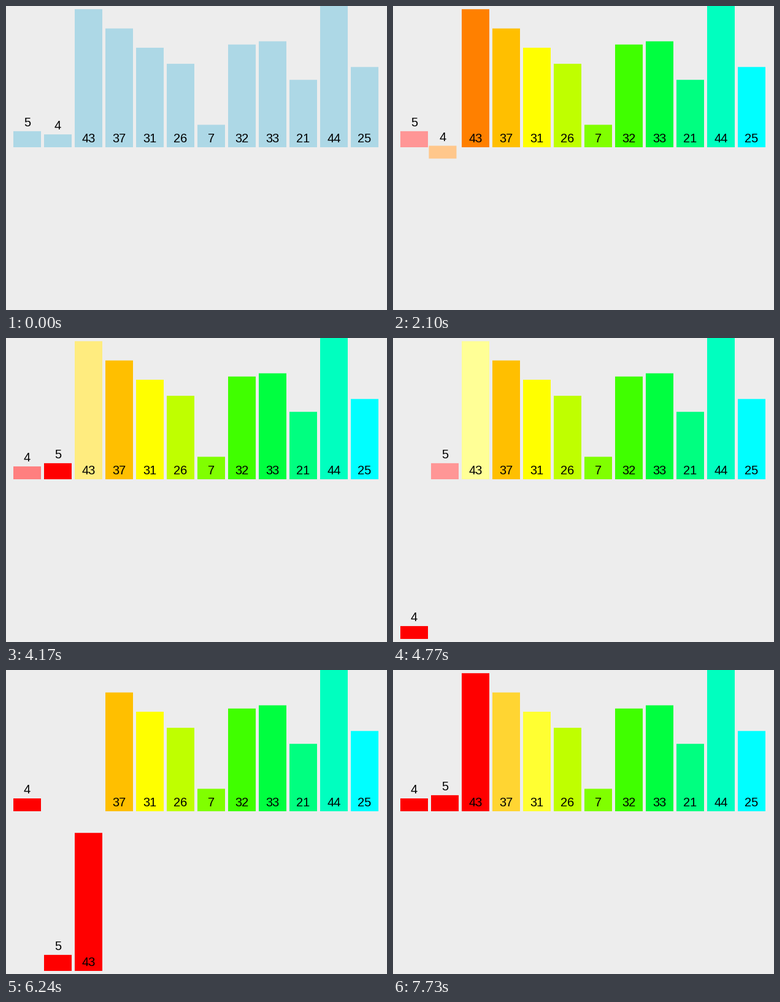
A matplotlib script that plays this animation: 621x495 px, repeating every 8000 ms.

```python
import colorsys

import matplotlib.pyplot as plt
import numpy as np
from matplotlib.animation import FuncAnimation
from matplotlib.patches import Rectangle

W, H, DPI = 621, 495, 100
LOOP, INTERVAL = 8000, 40
TICK = 148.9                               # the picture is refreshed in coarse ticks
START, BEAT, MOVE = 1028, 497, 240         # first action, spacing, tween length (ms)

VALUES = [5, 4, 43, 37, 31, 26, 7, 32, 33, 21, 44, 25]
UNIT = 230 / 44
BASE, DROP = 230, 260
LEFT, PITCH, BAR_W = 12, 50, 45

IDLE = np.array([173, 216, 230]) / 255
RED = np.array([1.0, 0, 0])


def hue_color(i):
    degrees = 15 * (i + (i > 7))
    return np.array(colorsys.hsv_to_rgb(degrees / 360, 1, 1))


def pale(color):
    return np.minimum(color + 150 / 255, 1)


def ease(u):
    u = min(max(u, 0), 1)
    return 4 * u**3 if u < 0.5 else 1 - (2 - 2 * u)**3 / 2


HUES = [hue_color(i) for i in range(len(VALUES))]
PALE = [pale(c) for c in HUES]
FIVE, FOUR, FORTY3, THIRTY7, THIRTY1 = range(5)

# Each bar has a list of tweens: (beat, slot, row, color); row 1 is the lower one.
tweens = [[(0, i, 0, HUES[i])] for i in range(len(VALUES))]


def add(beat, bar, slot, row, color):
    tweens[bar].append((beat, slot, row, color))


def merge(beat, order, first_slot):
    """Drop bars in sorted order, then lift them back one by one."""
    for n, bar in enumerate(order):
        add(beat + n, bar, first_slot + n, 1, RED)
        add(beat + len(order) + n, bar, first_slot + n, 0, RED)


add(1, FIVE, 0, 0, PALE[FIVE])
add(1, FOUR, 1, 0, PALE[FOUR])
merge(2, [FOUR, FIVE], 0)
add(6, FOUR, 0, 0, pale(RED))
add(6, FORTY3, 2, 0, PALE[FORTY3])
add(7, FIVE, 1, 0, pale(RED))
merge(7, [FOUR, FIVE, FORTY3], 0)
add(13, THIRTY7, 3, 0, PALE[THIRTY7])
add(13, THIRTY1, 4, 0, PALE[THIRTY1])
for steps in tweens:
    steps.sort(key=lambda step: step[0])


def bar_state(i, t):
    slot, row, color = i, 0, IDLE
    for beat, to_slot, to_row, to_color in tweens[i]:
        p = ease((t - START - beat * BEAT) / MOVE)
        slot += (to_slot - slot) * p
        row += (to_row - row) * p
        color = color + (to_color - color) * p
    return LEFT + PITCH * slot, BASE + DROP * row, color


fig = plt.figure(figsize=(W / DPI, H / DPI), dpi=DPI, facecolor="#ededed")
ax = fig.add_axes([0, 0, 1, 1])
ax.set_xlim(0, W)
ax.set_ylim(H, 0)
ax.axis("off")

bars, labels = [], []
for value in VALUES:
    bars.append(ax.add_patch(Rectangle((0, 0), BAR_W, value * UNIT, lw=0,
                                       snap=False, zorder=1)))
    labels.append(ax.text(0, 0, str(value), family="Liberation Sans",
                          fontsize=20 * 72 / DPI, color="black",
                          ha="center", va="baseline", zorder=2))


def update(frame):
    t = int((frame * INTERVAL + INTERVAL / 2) / TICK) * TICK
    for i, value in enumerate(VALUES):
        x, bottom, color = bar_state(i, t)
        height = value * UNIT
        bars[i].set_xy((x, bottom - height))
        bars[i].set_facecolor(np.clip(color, 0, 1))
        # Short bars carry their number on top.
        foot = bottom - height if height < 30 else bottom
        labels[i].set_position((x + BAR_W / 2, foot - 8))
    return bars + labels


anim = FuncAnimation(fig, update, frames=LOOP // INTERVAL, interval=INTERVAL,
                     repeat=True, repeat_delay=0, blit=False)
plt.show()
```
